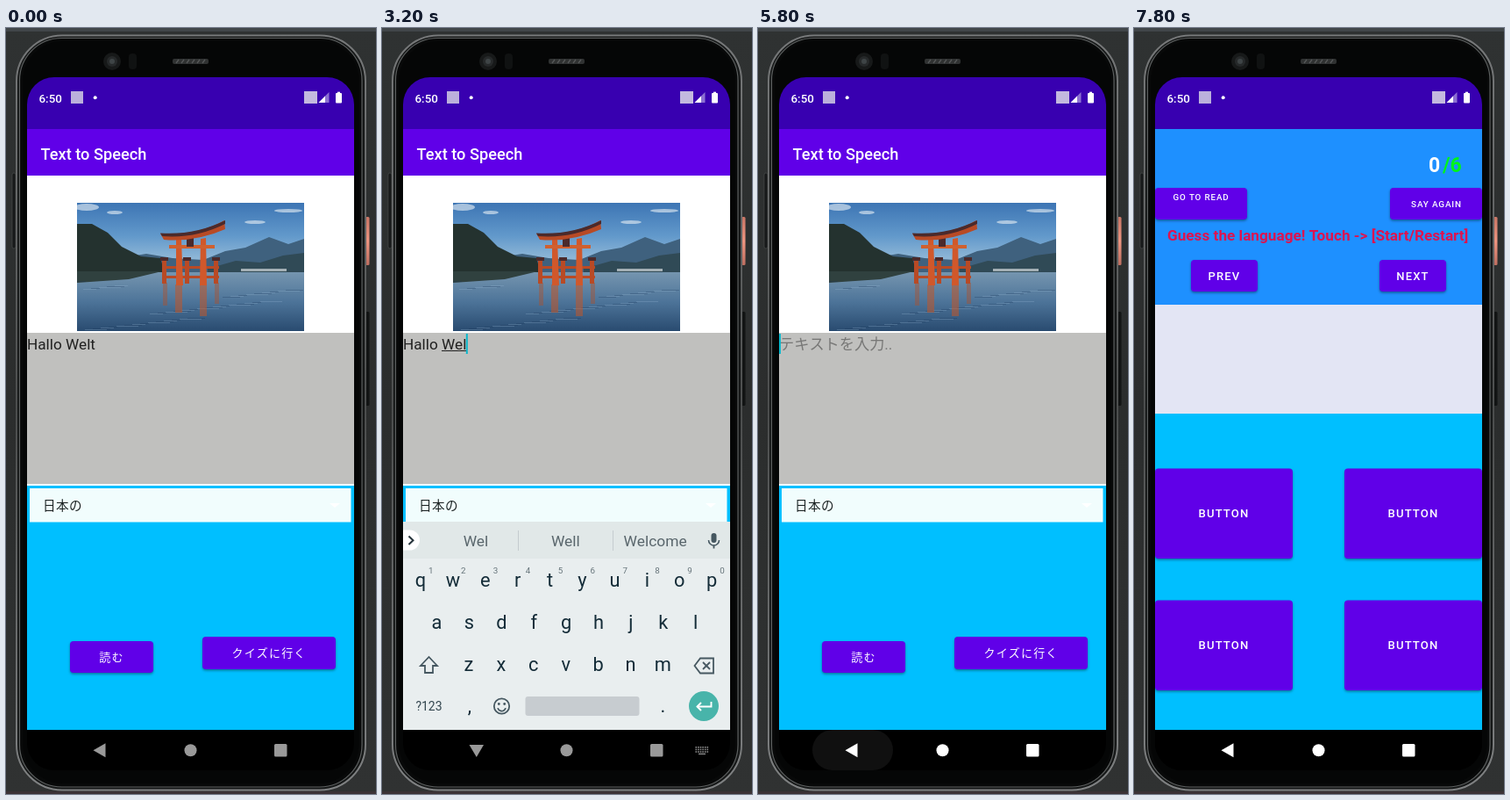
These frames come from a looping animation (422 by 872 pixels, 8 s). An HTML page with a canvas:

```html
<!DOCTYPE html>
<html lang="en">
<head>
<meta charset="utf-8">
<title>Text to Speech</title>
<style>
html, body { margin: 0; width: 100%; height: 100%; overflow: hidden; background: #2d2f2f; }
canvas { display: block; width: 422px; height: 872px; }
</style>
</head>
<body>
<canvas id="stage"></canvas>
<script>
const W = 422, H = 872, LOOP = 8000, STEP = 200;
const FONT = 'Roboto, "Noto Sans CJK JP", "Noto Sans CJK", sans-serif';
const PURPLE = '#6000e8', SKY = '#00bfff', TEAL = '#0bb8cb', KEY = '#142c38';

const canvas = document.getElementById('stage');
const dpr = window.devicePixelRatio || 1;
canvas.width = W * dpr;
canvas.height = H * dpr;
const c = canvas.getContext('2d');

function rect(x, y, w, h, fill) {
  c.fillStyle = fill;
  c.fillRect(x, y, w, h);
}

function round(x, y, w, h, r, fill, stroke, lw = 1) {
  c.beginPath();
  c.roundRect(x, y, w, h, r);
  if (fill) { c.fillStyle = fill; c.fill(); }
  if (stroke) { c.strokeStyle = stroke; c.lineWidth = lw; c.stroke(); }
}

function disc(x, y, r, fill) {
  c.beginPath();
  c.arc(x, y, r, 0, Math.PI * 2);
  c.fillStyle = fill;
  c.fill();
}

function path(points, fill, stroke, lw = 1) {
  c.beginPath();
  for (let i = 0; i < points.length; i += 2) c.lineTo(points[i], points[i + 1]);
  if (fill) { c.closePath(); c.fillStyle = fill; c.fill(); }
  if (stroke) { c.strokeStyle = stroke; c.lineWidth = lw; c.stroke(); }
}

function text(s, x, y, size, color, { weight = 400, align = 'left', gap = 0 } = {}) {
  c.font = `${weight} ${size}px ${FONT}`;
  c.letterSpacing = gap + 'px';
  c.textAlign = align;
  c.fillStyle = color;
  c.fillText(s, x, y);
}

function vertical(y0, y1, ...colors) {
  const g = c.createLinearGradient(0, y0, 0, y1);
  colors.forEach((k, i) => g.addColorStop(i / (colors.length - 1), k));
  return g;
}

function button(label, x, y, w, h, size = 13, dy = 0, dx = 0) {
  c.save();
  c.shadowColor = 'rgba(0,0,0,.4)';
  c.shadowBlur = 3 * dpr;
  c.shadowOffsetY = 1.5 * dpr;
  round(x, y, w, h, 4, PURPLE);
  c.restore();
  text(label, x + w / 2 + dx, y + h / 2 + size * 0.36 + dy, size, '#fff',
    { weight: 500, align: 'center', gap: size * 0.089 });
}

function phone() {
  rect(0, 0, W, H, vertical(0, H, '#2f3232', '#2b2d2d', '#303232'));
  rect(0, 0, W, 4, '#41464a');
  rect(0, 869, W, 3, '#3b3236');
  round(7, 165, 4, 86, 2, '#17191a', '#4a4c4c', .7);
  round(410, 215, 4.5, 55, 1.5, vertical(215, 270, '#c87565', '#ec9480', '#bd6e60'));
  round(410, 323, 4.5, 107, 1.5, '#121414');
  round(12, 8.5, 398, 859, 52, '#161818', vertical(8, 868, '#77797a', '#4b4d4d', '#808283'), 2);
  round(15.5, 11.5, 390.5, 852.5, 48, '#080909', '#5c5f5f', 1.2);
  round(19.5, 15, 383, 845, 45, '#050606');
  disc(121, 38, 10, '#171919');
  disc(121, 38, 6, '#26292a');
  disc(121, 38, 3, '#3e4446');
  round(140, 29, 9, 18, 4, '#101212');
  round(190, 35, 41, 6, 2, '#303232');
  for (let x = 194; x < 229; x += 6) path([x, 40, x + 3, 36], null, '#57595a', 1.3);
}

function gate() {
  const red = '#b84a25', dark = '#4b2a2b';
  rect(193, 292, 8, 32, 'rgba(193,87,40,.55)');
  rect(221, 292, 8, 36, 'rgba(193,87,40,.55)');
  rect(179, 290, 5, 26, 'rgba(170,80,45,.45)');
  rect(238, 290, 5, 24, 'rgba(170,80,45,.45)');
  for (const x of [178, 204, 237]) {
    rect(x, 264, 5, 27, red);
    rect(x - 2, 261, 9, 4, dark);
  }
  rect(179, 271, 64, 3, red);
  rect(179, 282, 64, 3, red);
  path([194, 241, 200, 241, 202, 293, 194, 293], '#d0582b');
  path([222, 240, 228, 239, 229, 293, 221, 293], '#d0582b');
  rect(186, 247, 52, 4, '#d0602f');
  rect(206, 239, 8, 10, dark);
  c.beginPath();
  c.moveTo(176, 234);
  c.quadraticCurveTo(216, 237, 249, 219);
  c.lineTo(250, 229);
  c.quadraticCurveTo(216, 244, 180, 241);
  c.fillStyle = red;
  c.fill();
  c.beginPath();
  c.moveTo(176, 233.5);
  c.quadraticCurveTo(216, 236, 250, 219);
  c.lineTo(250, 223);
  c.quadraticCurveTo(216, 240, 178, 237);
  c.fillStyle = dark;
  c.fill();
}

function photo() {
  c.save();
  c.beginPath();
  c.rect(81, 199, 259, 146);
  c.clip();
  rect(81, 199, 259, 82, vertical(199, 275, '#3d75b4', '#6299cb', '#a5c5dc'));
  for (const [x, y, rx, ry] of [[92, 204, 14, 4], [124, 210, 9, 2], [284, 221, 12, 2], [322, 208, 16, 2]]) {
    c.beginPath();
    c.ellipse(x, y, rx, ry, 0, 0, 7);
    c.fillStyle = 'rgba(222,232,242,.65)';
    c.fill();
  }
  path([130, 262, 160, 257, 190, 262, 225, 264, 250, 254, 273, 250, 300, 238, 322, 246, 340, 240, 340, 281, 130, 281], '#3f617e');
  path([230, 274, 262, 265, 290, 267, 316, 259, 340, 256, 340, 281, 230, 281], '#304a56');
  path([81, 223, 98, 223, 116, 233, 132, 249, 154, 260, 176, 262, 182, 282, 81, 283], '#24322f');
  rect(81, 278, 259, 67, vertical(278, 345, '#7595af', '#4d7499', '#294b70'));
  path([81, 277, 178, 277, 140, 286, 81, 290], '#30413f');
  rect(268, 274, 52, 3, '#a4b0b5');
  for (let i = 0; i < 44; i++) {
    const x = 81 + (i * 83) % 240, y = 288 + (i * 37) % 56;
    rect(x, y, 10 + i % 4 * 5, 1, i % 2 ? 'rgba(150,184,212,.28)' : 'rgba(20,48,82,.28)');
  }
  gate();
  c.restore();
}

// time, text, underlined word, caret index, handle index (-1 hides), suggestions
const FULL = 'Hallo Welt';
const HALLO = ['Hallo', 'Halloween', 'Hallow'];
const WELT = ['Welt', 'Welter', 'Welts'];
const WEL = ['Wel', 'Well', 'Welcome'];
const START = ['thanks', 'I', 'we'];
const EDITS = [
  [0, FULL, '', -1, -1, []],
  [400, FULL, '', 0, 0, []],
  [800, FULL, 'Hallo', -1, 0, HALLO],
  [1400, FULL, 'Hallo', 10, 0, HALLO],
  [1600, FULL, 'Welt', 10, 10, WELT],
  [1800, FULL, 'Welt', -1, 10, WELT],
  [2400, FULL, 'Welt', 10, 10, WELT],
  [2800, FULL, 'Welt', -1, 10, WELT],
  [3000, 'Hallo Wel', 'Wel', 9, -1, WELT],
  [3200, 'Hallo Wel', 'Wel', 9, -1, WEL],
  [3400, 'Hall', 'Hall', 4, -1, WEL],
  [3600, '', '', 0, -1, START],
  [4200, '', '', -1, -1, START],
  [4600, '', '', 0, -1, START],
  [5200, '', '', -1, -1, START],
  [5600, '', '', 0, -1, START],
  [6200, '', '', -1, -1, START]
];

function field([, value, word, caret, handle]) {
  const size = 17.2, x0 = 24;
  rect(24, 347, 373, 172, '#c0c0be');
  if (value) text(value, x0, 366, size, '#202020');
  else text('テキストを入力..', x0, 365.5, size, '#777776');
  c.font = `400 ${size}px ${FONT}`;
  c.letterSpacing = '0px';
  const at = n => x0 + c.measureText(value.slice(0, n)).width;
  if (word) {
    const i = value.indexOf(word);
    rect(at(i), 367, at(i + word.length) - at(i), 1, '#202020');
  }
  if (caret >= 0) rect(at(caret) - (caret ? .5 : 0), 348, 2, 23, TEAL);
  if (handle >= 0) {
    const x = at(handle);
    c.save();
    c.beginPath();
    c.rect(24, 347, 373, 172);
    c.clip();
    disc(x, 383, 10.5, TEAL);
    path([x, 371.5, x + 8, 377, x - 8, 377], TEAL);
    c.restore();
  }
}

function readPage(edit, pressed) {
  rect(24, 56, 373, 59, '#3800b0');
  rect(24, 115, 373, 53, PURPLE);
  text('Text to Speech', 39.5, 149.5, 18.2, '#fff', { weight: 500 });
  rect(24, 168, 373, 353, '#fff');
  photo();
  field(edit);
  rect(24, 521, 373, 278, SKY);
  rect(27, 524, 366.5, 38.5, '#f1fdfd');
  text('日本の', 42, 548.5, 14.6, '#1d2324', { gap: .45 });
  path([369, 541, 381, 541, 375, 546], '#fff');
  button('読む', 73, 698, 95, 36);
  button('クイズに行く', 224, 693, 152, 37);
  if (pressed) round(224, 693, 152, 37, 4, 'rgba(255,255,255,.22)');
}

function quizPage() {
  rect(24, 56, 373, 59, '#3800b0');
  rect(24, 115, 373, 200, '#1e90ff');
  rect(24, 315, 373, 124, '#e3e5f4');
  rect(24, 439, 373, 360, SKY);
  rect(24, 799, 373, 46, '#000');
  text('0', 336, 163.5, 23, '#fff', { weight: 700 });
  text('/6', 352, 163.5, 23, '#00f51a', { weight: 700 });
  button('GO TO READ', 24, 182, 105, 36, 9.8, -8);
  button('SAY AGAIN', 292, 182, 105, 36, 9.9, .5, .5);
  text('Guess the language! Touch -> [Start/Restart]', 38, 242, 17.2, '#dc1450', { weight: 700 });
  button('PREV', 65, 264, 76, 36, 13, .5);
  button('NEXT', 280, 264, 76, 36, 13, .5);
  for (const y of [501.5, 651.5])
    for (const x of [24, 240]) button('BUTTON', x, y, 157, 102.5, 13.1);
}

function letters(row, x, y) {
  [...row].forEach((k, i) => text(k, x + i * 36.9, y, 21.8, KEY, { align: 'center' }));
}

function keyboard(words) {
  const ink = '#465861', mid = { align: 'center' };
  rect(24, 562, 373, 237, '#e9eeef');
  rect(24, 562, 373, 42, '#e1e8e8');
  c.save();
  c.beginPath();
  c.rect(24, 562, 373, 237);
  c.clip();
  round(10, 571.5, 33, 23, 11.5, '#fff');
  c.restore();
  path([30.5, 578.5, 35.5, 583.2, 30.5, 588], null, '#26343b', 2);
  words.forEach((w, i) => text(w, 107 + i * 102.3, 590, 17.4, '#59666c', mid));
  rect(155, 572, 1, 23, '#c5cccf');
  rect(263, 572, 1, 23, '#c5cccf');

  round(375.5, 575, 6, 11, 3, ink);
  c.beginPath();
  c.arc(378.5, 583, 6, 0, Math.PI);
  c.strokeStyle = ink;
  c.lineWidth = 1.6;
  c.stroke();
  path([378.5, 589, 378.5, 592.5], null, ink, 1.8);

  letters('qwertyuiop', 44, 635.5);
  for (let i = 0; i < 10; i++) text((i + 1) % 10, 55.8 + i * 36.9, 621, 9.8, '#66747a', mid);
  letters('asdfghjkl', 62.5, 683.5);
  letters('zxcvbnm', 99, 731.5);

  path([53.5, 716, 63, 726, 58, 726, 58, 734, 49, 734, 49, 726, 44, 726, 53.5, 716, 63, 726], null, ink, 1.8);
  path([356.5, 726, 363, 717.5, 378, 717.5, 378, 734.5, 363, 734.5, 356.5, 726, 363, 717.5], null, ink, 1.8);
  path([366, 722, 374, 730], null, ink, 1.8);
  path([374, 722, 366, 730], null, ink, 1.8);

  text('?123', 53.5, 777, 14, '#33464f', mid);
  text(',', 100, 779, 22, KEY, mid);
  text('.', 320.5, 779, 22, KEY, mid);
  c.beginPath();
  c.arc(136.5, 772, 8.7, 0, Math.PI * 2);
  c.strokeStyle = ink;
  c.lineWidth = 1.8;
  c.stroke();
  c.beginPath();
  c.arc(136.5, 773, 4.6, .25, Math.PI - .25);
  c.stroke();
  disc(133.3, 769.5, 1.4, ink);
  disc(139.7, 769.5, 1.4, ink);
  round(163.5, 761, 130, 22, 3, '#c7ccd0');
  disc(367, 772, 17, '#48b4aa');
  path([375.5, 767, 375.5, 772.5, 359.5, 772.5], null, '#fff', 1.9);
  path([364, 768, 359.5, 772.5, 364, 777], null, '#fff', 1.9);
}

function statusIcons() {
  text('6:50', 37.5, 84.5, 13.4, '#fff', { weight: 500 });
  rect(74, 72, 14, 14, '#bbb0dc');
  disc(101.7, 79.2, 2, '#fff');
  rect(340, 72, 15, 14, '#c3b9df');
  path([356.5, 85, 368.5, 85, 368.5, 73], '#8c70d2');
  path([356.5, 85, 364, 85, 364, 77.5], '#fff');
  round(376, 74, 7, 11.5, 1, '#fff');
  rect(378, 72.7, 3, 2, '#fff');
}

function navIcons(color, typing) {
  path(typing ? [99.5, 816, 116, 816, 107.8, 830] : [99.5, 822.3, 113.5, 814.3, 113.5, 830.3], color);
  disc(210.5, 822.3, 7, color);
  round(306, 815, 14.5, 14.5, 1.5, color);
  if (!typing) return;
  for (let y = 0; y < 3; y++)
    for (let x = 0; x < 6; x++) rect(357.5 + x * 2.6, 818 + y * 2.6, 1.6, 1.6, '#8a8a8a');
  rect(361, 825.7, 8, 1.4, '#8a8a8a');
}

// cubic-bezier(.4, 0, .2, 1)
function ease(x) {
  let lo = 0, hi = 1;
  for (let i = 0; i < 24; i++) {
    const s = (lo + hi) / 2, r = 1 - s;
    if (1.2 * r * r * s + .6 * r * s * s + s * s * s < x) lo = s; else hi = s;
  }
  return lo * lo * (3 - 2 * lo);
}

function slidePages(edit, t) {
  const x = Math.min(1, Math.max(0, (t - 6883) / 425));
  const p = ease(x);
  if (x < 1) {
    c.save();
    c.translate(0, -15 * p);
    readPage(edit, t >= 6600);
    if (x > 0) rect(24, 56, 373, 743, 'rgba(0,0,0,.1)');
    c.restore();
  }
  if (x > 0) {
    const shift = 32.4 * (1 - p);
    const top = 56 + shift + 757 * (1 - x) ** 5.25;
    c.save();
    c.beginPath();
    c.rect(24, x < 1 ? top : 56, 373, 789);
    c.clip();
    c.translate(0, shift);
    quizPage();
    c.restore();
  }
}

function draw(t) {
  const edit = EDITS.findLast(e => e[0] <= t);
  const typing = t >= 600 && t < 5800;
  c.setTransform(dpr, 0, 0, dpr, 0, 0);
  phone();
  c.save();
  c.beginPath();
  c.roundRect(24, 56, 373, 789, 31);
  c.clip();
  rect(24, 56, 373, 789, '#000');
  slidePages(edit, t);
  if (typing) {
    c.save();
    c.beginPath();
    c.rect(24, 56, 373, 743);
    c.clip();
    c.translate(0, t < 800 ? 18 : 0);
    keyboard(edit[5]);
    c.restore();
  }
  if (t >= 5600 && t < 6200) round(62, 799, 92, 46, 23, t < 6000 ? '#101010' : '#080808');
  statusIcons();
  navIcons(t < 5600 ? '#999' : '#fff', typing);
  c.restore();
}

const begin = performance.now();
function tick() {
  const t = (performance.now() - begin) % LOOP;
  draw(Math.floor(t / STEP) * STEP);
  requestAnimationFrame(tick);
}
tick();
</script>
</body>
</html>
```
